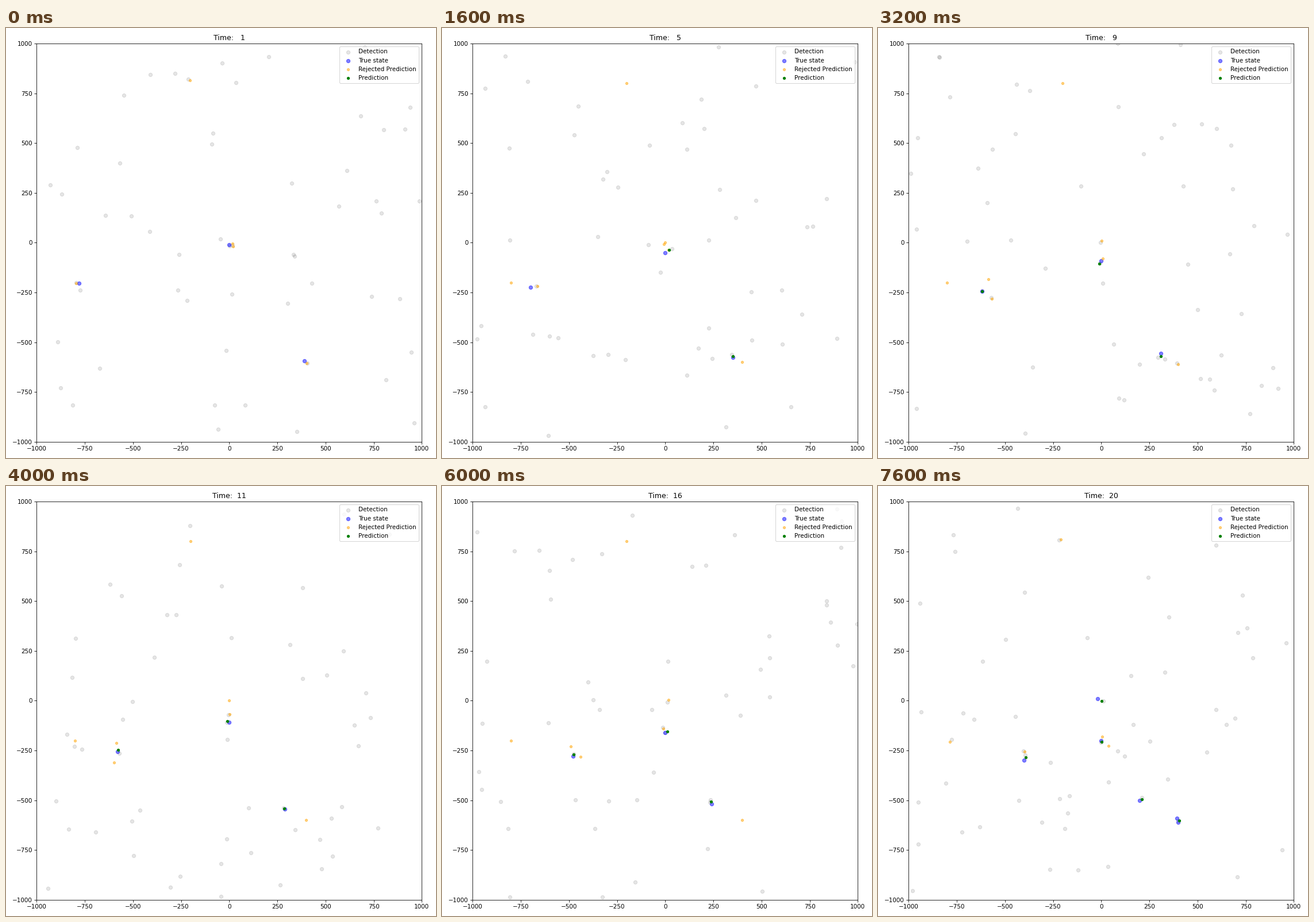
Recreate the animation shown at these times as a matplotlib script. Size 748 px wide and 748 px high, loop 8 s.

```python
import numpy as np
import matplotlib.pyplot as plt
from matplotlib.animation import FuncAnimation

SIZE, DPI = 748, 74.8
STEPS, STEP_MS = 20, 400
CLUTTER = 50

# Predictions are born at four points; targets leave from the first three
BIRTHS = np.array([(0, 0), (-800, -200), (400, -600), (-200, 800)])
SPEEDS = np.array([(0, -10), (20, -5), (-10, 5)])
CONFIRM_STEP = np.array([4, 6, 3])
REBORN = [0, 2]  # births that get new targets in the last step


def scene(step):
    """Detections, true states, rejected and confirmed predictions."""
    rng = np.random.default_rng(100 + step)

    def near(centers, spread):
        return centers + rng.normal(0, spread, np.shape(centers))

    clutter = rng.uniform(-1000, 1000, (CLUTTER, 2))
    targets = BIRTHS[:3] + SPEEDS * step
    confirmed = near(targets[step >= CONFIRM_STEP], 9)

    # A birth stays at rest unless a close detection pulls it away
    pulled = rng.random((4, 1)) < (1 if step == 1 else 0.15)
    births = np.where(pulled, near(BIRTHS, 9), BIRTHS)
    count = 1 if step == 1 else rng.integers(2, 5)
    strays = near(targets[rng.integers(0, 2, count)], 12 if step == 1 else 40)

    if step == STEPS:
        confirmed = np.vstack([confirmed, near(BIRTHS[REBORN], 3)])
        targets = np.vstack([targets, near(BIRTHS[REBORN + [2]], 7)])
        births = np.delete(births, REBORN, axis=0)

    echoes = near(np.vstack([confirmed, strays[:1], births[pulled[:len(births), 0]]]), 6)
    return (np.vstack([clutter, echoes]), targets,
            np.vstack([births, strays]), confirmed)


plt.rcParams["font.family"] = "DejaVu Sans"
fig, ax = plt.subplots(figsize=(SIZE / DPI, SIZE / DPI), dpi=DPI)
fig.subplots_adjust(left=53.4 / SIZE, right=723.3 / SIZE,
                    bottom=1 - 719.7 / SIZE, top=1 - 27 / SIZE)
ax.set(xlim=(-1000, 1000), ylim=(-1000, 1000))
ax.set_xticks(range(-1000, 1001, 250))
ax.set_yticks(range(-1000, 1001, 250))

STYLES = [("Detection", "black", 0.1, 36), ("True state", "blue", 0.5, 36),
          ("Rejected Prediction", "orange", 0.5, 16),
          ("Prediction", "green", 1, 16)]
layers = [ax.scatter([], [], color=color, alpha=alpha, s=area, linewidths=1,
                     label=label) for label, color, alpha, area in STYLES]
ax.legend(loc="upper right")
title = ax.set_title("")


def update(frame):
    step = frame + 1
    for layer, xy in zip(layers, scene(step)):
        layer.set_offsets(xy)
    title.set_text(f"Time: {step:3d}")
    return [*layers, title]


anim = FuncAnimation(fig, update, frames=STEPS, interval=STEP_MS,
                     repeat=True, repeat_delay=0, blit=False)
plt.show()
```
